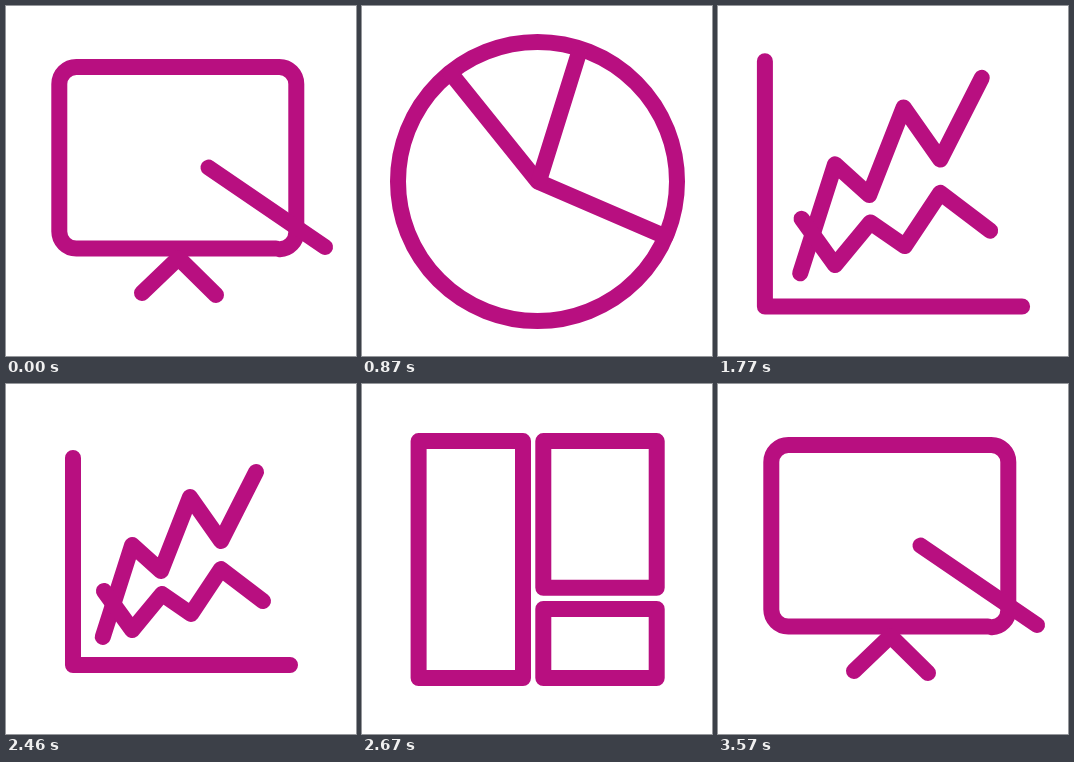
An HTML page with a canvas that plays this animation: 350x350 px, repeating every 3690 ms.

```html
<!DOCTYPE html>
<html lang="en">
<head>
<meta charset="utf-8">
<title>Chart icons</title>
<style>
  html, body { margin: 0; width: 100%; height: 100%; overflow: hidden; background: #fff; }
  canvas { display: block; width: 350px; height: 350px; }
</style>
</head>
<body>
<canvas id="stage"></canvas>
<script>
const SIZE = 350, MID = 175.5, LINE = 16, COLOR = '#b80f80';
const LOOP = 3690, STEP = 30, PERIOD = 900, LEAD = 150, EASE = 120;

const canvas = document.getElementById('stage');
const ctx = canvas.getContext('2d');
const ratio = window.devicePixelRatio || 1;
canvas.width = canvas.height = SIZE * ratio;

// Points scale about the centre while the stroke keeps its width.
let scale = 1;
const at = v => MID + (v - MID) * scale;

function line(...pts) {
  ctx.beginPath();
  for (let i = 0; i < pts.length; i += 2) ctx.lineTo(at(pts[i]), at(pts[i + 1]));
  ctx.stroke();
}

function box(x1, y1, x2, y2) {
  ctx.beginPath();
  ctx.rect(at(x1), at(y1), (x2 - x1) * scale, (y2 - y1) * scale);
  ctx.stroke();
}

function board() {
  const l = 53.3, t = 61, r = 290.3, b = 242.6, radius = 17 * scale;
  const corner = (x1, y1, x2, y2) => ctx.arcTo(at(x1), at(y1), at(x2), at(y2), radius);
  ctx.beginPath();
  ctx.moveTo(at(273), at(b + 0.6));
  corner(r, b, r, t);
  corner(r, t, l, t);
  corner(l, t, l, b);
  corner(l, b, r, b);
  ctx.lineTo(at(270), at(b));
  ctx.stroke();
  line(136, 287, 172.5, 252, 210, 289);
  line(202.5, 161.5, 319, 241);
}

function pie() {
  ctx.beginPath();
  ctx.arc(MID, MID, 139.5 * scale, 0, Math.PI * 2);
  ctx.stroke();
  line(88.5, 67, 176, 175.7, 303.5, 230.7);
  line(217.5, 45, 176.8, 175.5);
}

function graph() {
  line(46.9, 55.2, 46.9, 300.5, 304.1, 300.5);
  line(82.2, 267.3, 117, 158.3, 151.2, 189.1, 185.6, 101.4, 222.3, 153.6, 263.8, 71.8);
  line(83.6, 212.8, 117, 259.1, 152.4, 216.4, 186.8, 240.1, 222.3, 186.8, 272.1, 224.7);
}

function tiles() {
  box(56.6, 57.1, 161, 294);
  box(181.3, 57.1, 294.7, 203.8);
  box(181.3, 225, 294.7, 294);
}

const icons = [board, pie, graph, tiles];

function draw(time) {
  const t = Math.floor((time % LOOP) / STEP) * STEP + LEAD;
  const phase = t % PERIOD;
  const u = Math.min(phase, PERIOD - phase, EASE) / EASE;
  scale = Math.max(u * u * (3 - 2 * u), 0.001);

  ctx.setTransform(ratio, 0, 0, ratio, 0, 0);
  ctx.fillStyle = '#fff';
  ctx.fillRect(0, 0, SIZE, SIZE);
  ctx.strokeStyle = COLOR;
  ctx.lineWidth = LINE;
  ctx.lineCap = ctx.lineJoin = 'round';
  icons[Math.floor(t / PERIOD) % icons.length]();
}

const start = performance.now();
function tick() {
  draw(performance.now() - start);
  requestAnimationFrame(tick);
}
tick();
</script>
</body>
</html>
```
